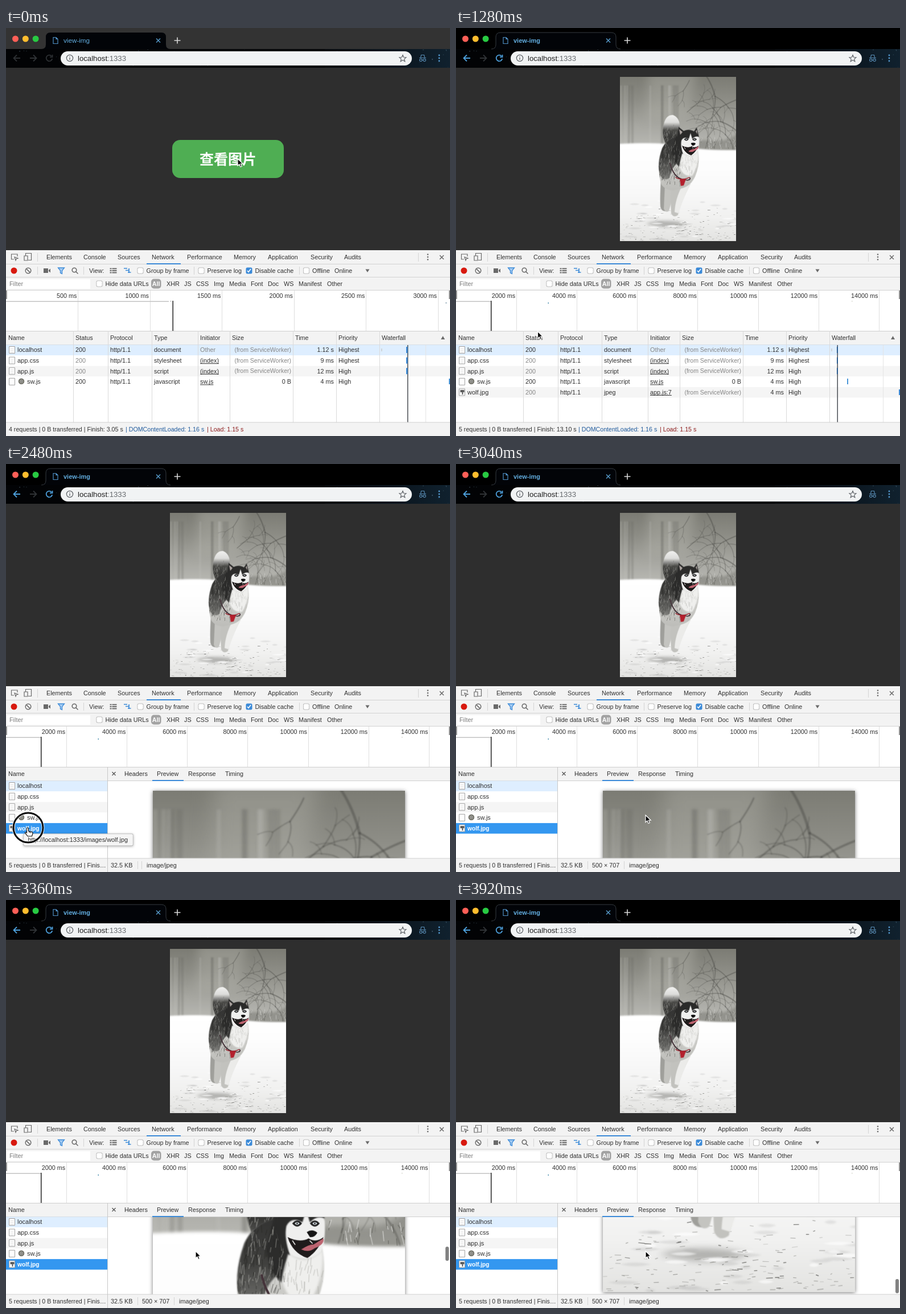
An HTML page with a canvas that plays this animation: 780 px wide and 718 px high, repeating every 4000 ms.

```html
<!DOCTYPE html>
<html lang="en">
<head>
<meta charset="utf-8">
<title>view-img</title>
<style>
html, body { margin: 0; width: 780px; height: 718px; overflow: hidden; background: #2e2e2e; }
canvas { display: block; }
</style>
</head>
<body>
<canvas id="stage" width="780" height="718"></canvas>
<script>
const LOOP = 4000, STEP = 80;
const OPEN_PHOTO = 320, OPEN_PANEL = 2400, PHOTO_LOADED = 2560;
const BLUE = '#3b8ad8', INK = '#303030', GREY = '#858585', ICON = '#6a6a6a';
const SANS = '"Liberation Sans", Arial, sans-serif';
const c = document.getElementById('stage').getContext('2d');

const box = (x, y, w, h, color) => { c.fillStyle = color; c.fillRect(x, y, w, h); };
const vline = (x, y, h, color = '#d4d4d4') => box(x, y, 1, h, color);
const pill = (x, y, w, h, r, color) => {
  c.fillStyle = color; c.beginPath(); c.roundRect(x, y, w, h, r); c.fill();
};
const dot = (x, y, r, color) => pill(x - r, y - r, 2 * r, 2 * r, r, color);
// y is the middle of the capital letters
function text(s, x, y, color = INK, { size = 10.8, align = 'left', weight = 400, font = SANS } = {}) {
  c.font = `${weight} ${size}px ${font}`;
  c.textAlign = align;
  c.fillStyle = color;
  c.fillText(s, x, y + size * .36);
}
const right = (s, x, y, color) => text(s, x, y, color, { align: 'right' });
function icon(x, y, d, stroke, width = 1.3, fill) {
  const path = new Path2D(d);
  c.save();
  c.translate(x, y);
  if (fill) { c.fillStyle = fill; c.fill(path); }
  if (stroke) { c.strokeStyle = stroke; c.lineWidth = width; c.stroke(path); }
  c.restore();
}
const circle = r => `M${r} 0A${r} ${r} 0 1 1 ${-r} 0A${r} ${r} 0 1 1 ${r} 0`;
const CROSS = 'M-3.5-3.5L3.5 3.5M3.5-3.5L-3.5 3.5';

function checkbox(x, y, label, checked) {
  pill(x - 5.5, y - 5.5, 11, 11, 2.5, checked ? BLUE : '#b0b0b0');
  if (checked) icon(x, y, 'M-3 0L-1 2.5L3-3', '#fff', 1.6);
  else pill(x - 4.7, y - 4.7, 9.4, 9.4, 2, '#fff');
  text(label, x + 10.5, y);
}

function seeded(seed) {
  return () => (seed = (seed * 16807) % 2147483647) / 2147483647;
}
const smooth = p => { p = Math.min(1, Math.max(0, p)); return p * p * (3 - 2 * p); };
function track(keys, t) {
  const i = keys.findIndex(k => k[0] > t);
  if (i < 0) return keys.at(-1).slice(1);
  const [a, b] = [keys[i - 1], keys[i]];
  const p = smooth((t - a[0]) / (b[0] - a[0]));
  return [1, 2].map(n => a[n] + (b[n] - a[n]) * p);
}

function makePhoto() {
  const canvas = document.createElement('canvas');
  canvas.width = 500; canvas.height = 707;
  const p = canvas.getContext('2d'), rnd = seeded(41);
  p.scale(500 / 204, 707 / 289);
  p.lineCap = 'round';
  const shape = (d, color, blur = .8) => {
    p.filter = `blur(${blur}px)`; p.fillStyle = color; p.fill(new Path2D(d));
  };
  const stroke = (d, color, w, blur = .6) => {
    p.filter = `blur(${blur}px)`; p.strokeStyle = color; p.lineWidth = w; p.stroke(new Path2D(d));
  };
  const fade = (y0, y1, ...colors) => {
    const g = p.createLinearGradient(0, y0, 0, y1);
    colors.forEach((col, i) => g.addColorStop(i / (colors.length - 1), col));
    return g;
  };
  // short hairs scattered inside an outline
  const fur = (d, x, y, w, h, count, color) => {
    p.save();
    p.clip(new Path2D(d));
    for (let i = 0; i < count; i++) {
      stroke(`M${x + rnd() * w} ${y + rnd() * h}l${rnd() * 3 - 2} ${3 + rnd() * 5}`, color, .8, .3);
    }
    p.restore();
  };

  p.fillStyle = fade(0, 125, '#7c7c74', '#8e8e87', '#a6a6a0', '#babab5');
  p.fillRect(0, 0, 204, 289);
  shape('M50-10H135L120 75H45Z', '#b4b4ae60', 20);
  for (let i = 0; i < 12; i++) {
    const x = rnd() * 100;
    shape(`M${x} 15h${2 + rnd() * 4}V122h-4Z`, i % 2 ? '#62625c38' : '#c4c4be38', 2.5);
  }
  const branch = (x, y, angle, len, w) => {
    const nx = x + Math.cos(angle) * len, ny = y + Math.sin(angle) * len;
    stroke(`M${x} ${y}Q${(x + nx) / 2 + 3} ${(y + ny) / 2 - 3} ${nx} ${ny}`, '#4d4d4878', w, .8);
    if (w > .65) for (const turn of [-.5, .4]) branch(nx, ny, angle + turn + rnd() * .3 - .15, len * .75, w * .68);
  };
  branch(150, -4, 1.15, 42, 2.2);
  branch(122, 6, 2.1, 22, 1.2);
  branch(208, 98, 3.7, 36, 2);
  branch(206, 40, 2.7, 32, 1.7);
  branch(118, 62, -.7, 26, 1.3);
  branch(200, 128, 4.2, 30, 1.6);
  branch(150, 126, 4.9, 20, 1.3);
  shape('M122 127Q132 108 160 112T210 98V132H122Z', '#66666070', 6);
  shape('M-20 119Q70 113 110 122T224 128V310H-20Z', fade(120, 289, '#fff', '#fdfdfd', '#f8f8f8', '#f1f1f0', '#e3e3e1'), 3);
  for (let i = 0; i < 40; i++) {
    const x = 130 + rnd() * 74, y = 112 + rnd() * 16;
    stroke(`M${x} ${y}l${rnd() * 4 - 2} ${-2 - rnd() * 6}`, i % 2 ? '#5c5c5680' : '#e8e8e680', .8);
  }

  // shadow, hollows and twigs on the snow
  shape('M45 258Q80 249 118 258Q90 270 45 258Z', '#77777380', 7);
  for (let i = 0; i < 45; i++) {
    const x = rnd() * 204, y = 218 + rnd() * 70, w = 8 + rnd() * 20;
    shape(`M${x} ${y}q${w / 2}-3 ${w} 0q${-w / 2} 3 ${-w} 0`, i % 3 ? '#a6a6a238' : '#ffffffa0', 1.8);
  }
  for (let i = 0; i < 160; i++) {
    const x = rnd() * 204, y = 228 + Math.sqrt(rnd()) * 60, w = .6 + rnd() * 4.5;
    stroke(`M${x} ${y}l${w} ${rnd() * 1.2 - .6}`, i % 4 ? '#77777270' : '#3f3f3ca0', .3 + rnd() * .5, .3);
  }

  // tail and legs
  const tail = 'M82 122Q72 102 77 84Q80 67 93 67Q106 72 105 90Q102 104 97 119Z';
  shape(tail, fade(67, 120, '#f2f2f0', '#dcdcda', '#4c4c49', '#373735', '#5a5a57'), 1.2);
  fur(tail, 75, 84, 30, 34, 60, '#8a8a8690');
  shape('M72 182Q70 210 71 228Q73 238 82 236Q80 224 84 210L92 188Z', '#9f9f9b');
  shape('M79 190L77 232Q80 240 86 236L99 190Z', '#c4c4c0');
  shape('M92 185Q88 212 90 240Q94 249 102 243Q104 226 124 188Z', '#c2c2be');
  shape('M109 192Q97 215 96 238L103 240Q110 216 124 188Z', '#ebebe9');

  // body
  const body = 'M74 126Q84 106 108 106L136 126Q142 148 134 170Q126 194 104 197Q84 204 73 190Q63 160 74 126Z';
  shape(body, fade(108, 200, '#d8d8d5', '#d9d9d6', '#c9c9c5', '#bdbdb9'), 1.2);
  shape('M74 126Q84 105 108 105Q102 128 104 150Q92 156 87 178Q78 184 71 174Q64 154 74 126Z', fade(105, 180, '#333332', '#40403e', '#777774'), 1.5);
  shape('M98 105L108 106L112 130Q106 142 104 158Q92 146 92 128Z', '#2c2c2b', 1.5);
  shape('M110 134Q122 146 137 132Q139 154 127 174Q110 176 105 158Z', '#efefed', 2);
  fur(body, 64, 110, 42, 75, 110, '#a8a8a468');
  fur(body, 64, 110, 42, 75, 110, '#25252458');
  fur(body, 100, 135, 40, 55, 60, '#a9a9a560');
  stroke('M88 152Q94 176 109 180T123 178', '#45333a', 1.8);
  stroke('M98 177Q108 183 122 177', '#9e2630', 1.4);
  shape('M105 180L116 180L112 191L107 192Z', '#b3202d');

  // head
  shape('M101 110L103 89L112 95Q122 92 130 97L135 90L139 108Q140 124 136 133Q126 142 113 136Q102 130 101 110Z', '#efefee');
  shape('M99 114L103 88L112 95Q122 91 130 96L135 89L139 106Q133 103 127 109L124 99L121 109Q112 104 108 112Q106 122 111 136Q101 128 99 114Z', '#2b2b2a');
  shape('M104 92L106 102L110 97Z', '#b0a8a4');
  shape('M133 96L135 93L136 101Z', '#b0a8a4');
  for (const x of [116.7, 131]) {
    shape(`M${x - 4} 110q4-5 8 0q-4 5-8 0`, '#222', .4);
    shape(`M${x - 2} 110q2-2.4 4 0q-2 2.4-4 0`, '#dbe3e8', .3);
    shape(`M${x - .6} 109.4h1.2v1.2h-1.2Z`, '#222', .2);
  }
  shape('M124.5 117Q129 114 133 117.5Q131 121.5 127 121Z', '#151515', .4);
  shape('M109 121Q119 126 126 122Q132 126 138 121Q134 132 125 138Q113 134 109 121Z', '#1f1b1b', .5);
  shape('M120 131Q126 127 130 127L138 122Q139 127 131 130Q126 134 120 131Z', '#bd6470', .6);
  stroke('M113 124L115 127M127 124L129 126', '#f6f6f4', .7);
  return canvas;
}
const photo = makePhoto();

function browserChrome(active) {
  box(0, 0, 780, 70, '#020305');
  box(0, 0, 780, 37, active ? '#000' : '#333333');
  icon(0, 0, 'M62 37Q70 37 70 29V16Q70 8 78 8H273Q281 8 281 16V29Q281 37 289 37', active ? '#343a40' : null, 1, '#020408');
  const sky = c.createLinearGradient(560, 0, 780, 0);
  sky.addColorStop(0, '#04070b');
  sky.addColorStop(1, '#10212e');
  box(560, 37, 220, 33, sky);
  const rnd = seeded(9);
  for (let i = 0; i < 90; i++) dot(rnd() * 780, 38 + rnd() * 31, .3 + rnd() * .6, `rgba(130,165,190,${rnd() * .6})`);
  ['#ff5f57', '#ffbd2e', '#28ca42'].forEach((color, i) => dot(16.5 + 17.8 * i, 19, 5.5, color));
  icon(87, 22, 'M-4-5.5H1L4-2.5V5.5H-4ZM1-5.5V-2.5H4', '#4f8fc4', 1.2);
  text('view-img', 101, 22, '#62addf', active ? { size: 11, weight: 700 } : { size: 11.7 });
  icon(267.5, 22, CROSS, '#5a9fd0', 1.4);
  icon(301, 22, 'M-5.5 0H5.5M0-5.5V5.5', '#d8d8d8', 1.6);
  const nav = active ? '#4d9fdb' : '#2d3033';
  icon(19, 53, 'M6 0H-5.5M0-5.5L-5.5 0L0 5.5', nav, 1.8);
  icon(48, 53, 'M-6 0H5.5M0-5.5L5.5 0L0 5.5', '#303336', 1.8);
  icon(76, 53, 'M4-3.5A5.3 5.3 0 1 0 5.2 1M5.5-6V-1.8H1', nav, 1.8);
  pill(96, 41, 617, 25, 12.5, '#f1f3f4');
  icon(112, 53, circle(5.6) + 'M0-1V3M0-3.2V-2', '#5f6368', 1.3);
  text('localhost', 126, 53.5, '#1f1f1f', { size: 13.2 });
  text(':1333', 178, 53.5, '#666a6e', { size: 13.2 });
  icon(697, 53.5, 'M0-6L1.7-2L6-1.7L2.7 1.1L3.8 5.4L0 3L-3.8 5.4L-2.7 1.1L-6-1.7L-1.7-2Z', '#5f6368', 1.2);
  icon(732, 53, 'M-6-.5H6M-3.5-1L-2.5-5.5H2.5L3.5-1M-1 3.5H1M-1 3.5A2.2 2.2 0 1 1-5.4 3.5A2.2 2.2 0 1 1-1 3.5M5.4 3.5A2.2 2.2 0 1 1 1 3.5A2.2 2.2 0 1 1 5.4 3.5', '#5586ad', 1.2);
  for (const y of [48, 53, 58]) dot(761, y, 1.4, '#559ad0');
}

function page(showPhoto) {
  box(0, 70, 780, 321, '#2e2e2e');
  if (showPhoto) return c.drawImage(photo, 288, 86, 204, 289);
  pill(292, 197, 196, 67, 14, '#4fae53');
  text('查看图片', 390, 231, '#fff', { size: 25, weight: 700, align: 'center', font: '"Noto Sans CJK SC", "Noto Sans CJK JP", sans-serif' });
}

function toolbars() {
  box(0, 391, 780, 142, '#f3f3f3');
  for (const y of [415, 438, 461]) box(0, y, 780, 1, '#d2d2d2');
  icon(15, 403, 'M-1 4H-5.5V-5H5V-1M0 0L6 2.3L3.2 3.3L2 6Z', ICON, 1.2);
  icon(38, 403, 'M-3.5-2V-6.5H6.5V5.5H1M-6-2H0V6H-6Z', ICON, 1.2);
  for (const x of [55, 724]) vline(x, 396, 15);
  const tabs = { Elements: 71, Console: 136, Sources: 196, Network: 256, Performance: 318, Memory: 400, Application: 460, Security: 535, Audits: 594 };
  for (const name in tabs) text(name, tabs[name], 403);
  box(247, 414, 60, 2, BLUE);
  for (const y of [398.5, 403, 407.5]) dot(741, y, 1.3, ICON);
  icon(765.5, 403.5, CROSS, ICON, 1.5);

  dot(14, 427, 5.5, '#d8190f');
  icon(39, 427, circle(4.8) + 'M-3.4-3.4L3.4 3.4', ICON, 1.5);
  icon(72, 427, 'M-6-4H2V4H-6ZM3-1L6-3.5V3.5L3 1Z', null, 0, ICON);
  icon(97, 427, 'M-5.5-5H5.5L1.5 0V5.5L-1.5 4V0Z', BLUE, 1.3, '#a8cdf2');
  icon(120, 426, circle(3.8) + 'M2.8 2.8L6.5 6.5', ICON, 1.6);
  text('View:', 146, 427);
  icon(188.5, 427, 'M-6-3.5H-3M-2-3.5H6M-6 0H-3M-2 0H6M-6 3.5H-3M-2 3.5H6', ICON, 2);
  icon(213, 427, 'M-6-4H0M-3-.5H3M1 3H6.5M3-4V4', BLUE, 1.7);
  for (const x of [55, 136, 330, 515]) vline(x, 420, 14);
  checkbox(236, 427, 'Group by frame');
  checkbox(343, 427, 'Preserve log');
  checkbox(427, 427, 'Disable cache', true);
  checkbox(527.5, 427, 'Offline');
  text('Online', 577, 427);
  icon(635, 427, 'M-3.5-2.5H3.5L0 3Z', null, 0, ICON);

  box(2, 442, 146, 17, '#fff');
  text('Filter', 6, 450.5, '#7d7d7d');
  checkbox(164, 450, 'Hide data URLs');
  pill(255, 441.5, 17.5, 17, 5, '#a3a3a3');
  text('All', 263.7, 450, '#fff', { align: 'center', weight: 700 });
  const types = { XHR: 282, JS: 313, CSS: 334, Img: 365, Media: 392, Font: 430, Doc: 460, WS: 488, Manifest: 514, Other: 564 };
  for (const name in types) text(name, types[name], 450);
}

function overview(late) {
  box(0, 462, 780, 71, '#fff');
  const [gap, ms] = late ? [106.2, 2000] : [126.5, 500];
  for (let i = 1; i * gap < 780; i++) {
    vline(Math.floor(i * gap), 462, 71, '#dedede');
    right(`${i * ms} ms`, i * gap - 2, 471.5);
  }
  box(0, 480.5, late ? 61 : 286, 1.5, '#c3c3c3');
  box(late ? 61 : 292.5, 480, 1.5, 53, '#252525');
  if (late) {
    box(161.5, 483, 1.5, 2, '#4a90b0');
    box(695, 480, 1.5, 1.5, '#d0d0c8');
  } else {
    box(288.5, 480, 2, 1.5, '#b8b8b8');
    box(772, 483, 2.5, 1.5, '#8fa6b5');
  }
  for (const x of [0, 778]) box(x, 462, 2, 15, '#949494');
}

const ROWS = [
  ['localhost', 'document', 'Other', '1.12 s', 'Highest'],
  ['app.css', 'stylesheet', '(index)', '9 ms', 'Highest'],
  ['app.js', 'script', '(index)', '12 ms', 'High'],
  ['sw.js', 'javascript', 'sw.js', '4 ms', 'High'],
  ['wolf.jpg', 'jpeg', 'app.js:7', '4 ms', 'High'],
];
const COLUMNS = { Name: 0, Status: 118, Protocol: 179, Type: 256, Initiator: 337, Size: 393, Time: 504, Priority: 580, Waterfall: 656 };

function table(late, panel, hover) {
  box(0, 533, 780, 161, '#fff');
  box(0, 533, 780, 24, '#f3f3f3');
  for (const y of [533, 557]) box(0, y, 780, 1, '#cfcfcf');
  const rows = ROWS.slice(0, late ? 5 : 4);
  rows.forEach(([name, type, initiator, time, priority], i) => {
    const top = 557.5 + 18.6 * i, y = top + 9;
    const selected = panel && i === 4;
    const fill = selected ? '#3497f0' : i === 0 ? '#deeeff' : i === 4 && hover ? '#eef3fb' : i % 2 ? '#fff' : '#f5f5f5';
    box(0, top, 780, 18.6, fill);
    icon(10.5, y, 'M-5-6H5V6H-5Z', '#a0a0a0', 1, '#fff');
    if (i < 3) icon(10.5, y, 'M-3-2H3M-3 1H3M-3 4H3', '#e2e2e2', 1);
    if (i === 3) icon(27, y - .5, circle(4), '#77776f', 2.6, '#c8c8c0'), icon(27, y - .5, circle(1.5), '#555', 1);
    if (i === 4) icon(10.5, y, 'M-3-4H4V0H2V4H0V0H-3Z', null, 0, '#5b5b5b');
    text(name, i === 3 ? 37 : 20, y, selected ? '#fff' : INK, selected ? { size: 10.2, weight: 700 } : { size: 11 });
    if (panel) return;
    text('200', 122, y, i % 3 ? GREY : INK);
    text('http/1.1', 183, y);
    text(type, 260, y, INK);
    text(initiator, 341, y, i ? INK : GREY);
    if (i) box(341, y + 5, c.measureText(initiator).width, 1, INK);
    if (i === 3) right('0 B', 501, y);
    else text('(from ServiceWorker)', 501, y, GREY, { size: 10.5, align: 'right' });
    right(time, 576, y);
    text(priority, 584, y);
  });
  text('Name', 4, 545);
  if (panel) return;
  for (const name in COLUMNS) {
    const x = COLUMNS[name];
    if (!x) continue;
    vline(x, 533, 161, '#dadada');
    text(name, x + 4, 545);
  }
  icon(767.5, 545, 'M-3.5 3H3.5L0-3Z', null, 0, ICON);
  const load = late ? 669.5 : 705;
  vline(late ? 750 : 737, 558, 136, '#e4e4e4');
  box(load, 558, 1.5, 136, '#4b4f55');
  for (const i of [0, 1, 2]) box(load - (late ? .5 : 2), 561 + 18.6 * i, late ? 2 : 2.5, 11, late ? '#2c5c8f' : BLUE);
  box(659, 564, 2, 5, '#cfd5d9');
  box(late ? 687 : 778, 617, 2, 10, '#4a96d8');
  if (late) box(778, 636, 2, 10, BLUE);
}

function statusBar(late, panel) {
  box(0, 694, 780, 24, '#f3f3f3');
  box(0, 693.5, 780, 1, '#cfcfcf');
  const summary = `${late ? 5 : 4} requests | 0 B transferred | Finis`;
  const style = { size: 10.65 };
  if (panel) return text(summary + '…', 5, 706, INK, style);
  const x = late ? 220 : 215;
  text(`${summary}h: ${late ? '13.10' : '3.05'} s`, 5, 706, INK, style);
  text('| DOMContentLoaded: 1.16 s', x - 5, 706, '#1f5a9c', style);
  text('| Load: 1.15 s', x + 138, 706, '#8c1a1a', style);
}

function previewPanel(t) {
  box(178, 533, 602, 185, '#f3f3f3');
  box(178, 557, 602, 137, '#fff');
  for (const y of [533, 557, 693.5]) box(178, y, 602, 1, '#cfcfcf');
  icon(189.5, 545, 'M-3-3L3 3M3-3L-3 3', '#555', 1.3);
  const tabs = { Headers: 208, Preview: 265, Response: 320, Timing: 385 };
  for (const name in tabs) text(name, tabs[name], 545);
  box(257, 556, 55, 2, BLUE);

  const scroll = 512 * smooth((t - 3040) / 660);
  c.save();
  c.beginPath(); c.rect(179, 558, 601, 135.5); c.clip();
  c.shadowColor = '#0008'; c.shadowBlur = 7; c.shadowOffsetY = 1;
  c.drawImage(photo, 258, 575 - scroll, 443, 627);
  c.restore();
  if (scroll > 0) pill(772, 558 + scroll * .2127, 6, 25, 3, '#828282');

  vline(178, 533, 185, '#c8c8c8');
  text('32.5 KB', 184, 706);
  vline(231, 699, 14);
  if (t < PHOTO_LOADED) {
    vline(238, 699, 14);
    text('image/jpeg', 247, 706);
  } else {
    text('500 × 707', 239, 706);
    vline(295, 699, 14);
    text('image/jpeg', 304, 706);
  }
}

function tooltip(x, y) {
  c.save();
  c.shadowColor = '#0005'; c.shadowBlur = 4; c.shadowOffsetY = 1;
  pill(x, y, 193, 21.5, 2, '#b9b9b9');
  c.restore();
  pill(x + .7, y + .7, 191.6, 20.1, 2, '#f5f5f5');
  text('http://localhost:1333/images/wolf.jpg', x + 8, y + 10.5, INK, { size: 10.9 });
}

const PATH = [
  [0, 407, 230], [480, 402, 231], [800, 402, 231], [1520, 53, 640], [2080, 53, 640],
  [2280, 38, 640], [2640, 38, 640], [2960, 333, 618],
];
function pointer(x, y) {
  if (x < 118 && y > 631) {
    icon(x, y, 'M-1.5 1Q0-1 1.5 1V6L6 7Q9 7 9 10L7.5 15H0L-4.5 9Q-4 7-1.5 9ZM3 7V9M5.5 7.5V9.5', '#111', 1.2, '#fff');
  } else {
    icon(x, y, 'M0 0V12.5L3 9.8L5 14.5L7.3 13.5L5.3 9H9.2Z', '#fff', 1.2, '#000');
  }
}
function clickRing(x, y) {
  icon(x, y, circle(26), '#fffc', 5);
  icon(x, y, circle(26), '#0b0b0b', 3);
}
const between = (t, a, b) => t >= a && t < b;

function draw(t) {
  const late = t >= OPEN_PHOTO, panel = t >= OPEN_PANEL;
  const [x, y] = track(PATH, t);
  browserChrome(late);
  page(late);
  toolbars();
  overview(late);
  table(late, panel, y > 631);
  statusBar(late, panel);
  if (panel) previewPanel(t);
  if (between(t, 1760, 2160)) tooltip(67, 642.5);
  if (between(t, 2320, 2640)) tooltip(30.5, 650.5);
  pointer(x, y);
  if (between(t, 160, 320) || between(t, 2320, 2560)) clickRing(x + 1, y);
}

function tick(now) {
  draw(Math.floor((now % LOOP) / STEP) * STEP);
  requestAnimationFrame(tick);
}
requestAnimationFrame(tick);
</script>
</body>
</html>
```
